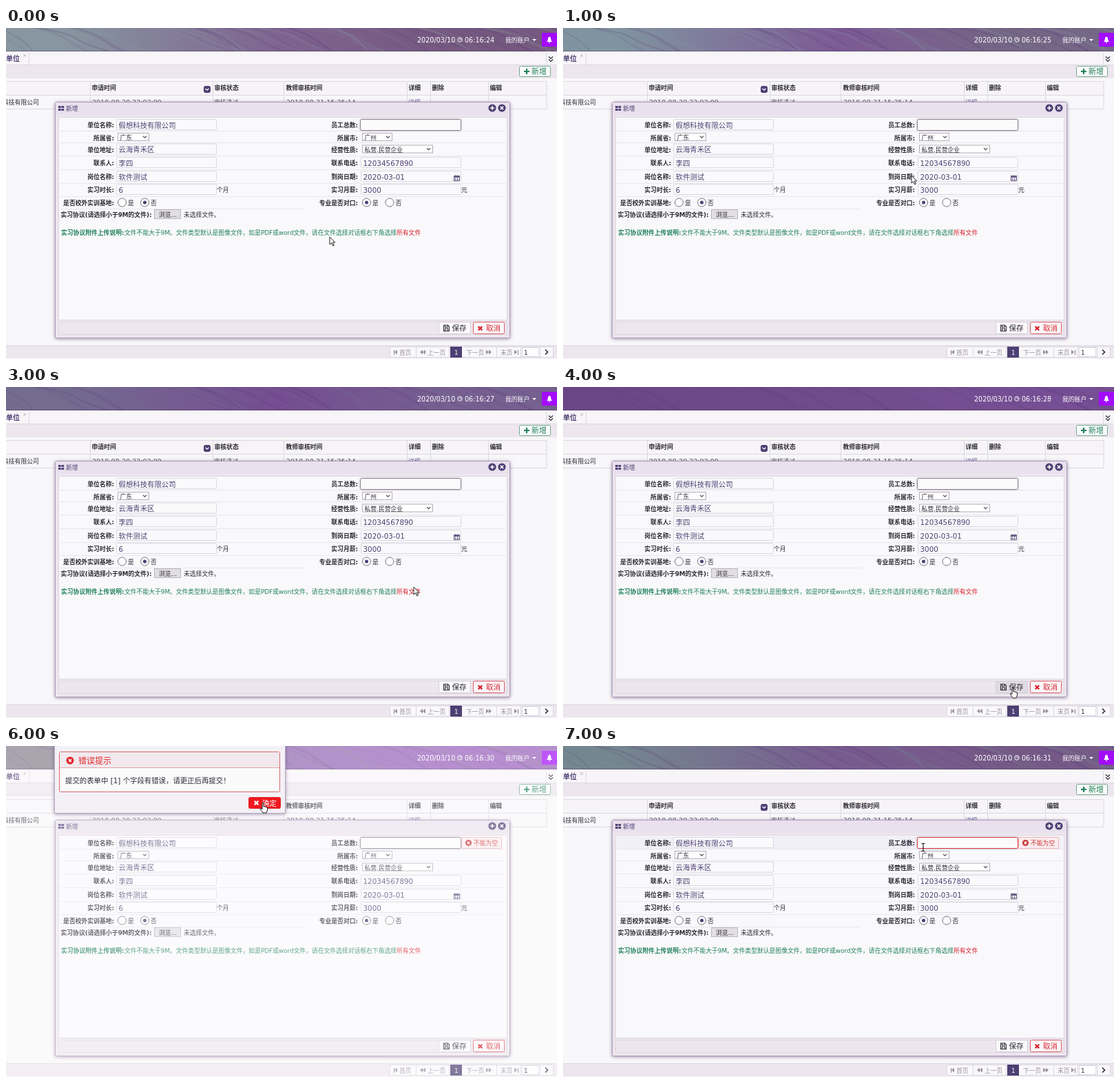
An HTML page that plays this animation: 800 by 480 pixels, repeating every 8 s.

```html
<!DOCTYPE html>
<html lang="zh-CN">
<head>
<meta charset="utf-8">
<title>新增</title>
<style>
html, body { margin: 0; width: 100%; height: 100%; overflow: hidden; background: #f8f7f9; }
svg { display: block; width: 800px; height: 480px; }
text { font-family: "DejaVu Sans", "Noto Sans CJK SC", "Noto Sans CJK", sans-serif; white-space: pre; }
.shadow { filter: drop-shadow(0 1px 2.5px #5e3f7290); }
.glow { filter: drop-shadow(0 0 1.5px #5e3f7260); }
</style>
</head>
<body>
<svg id="stage" viewBox="0 0 800 480"></svg>
<script>
const INK = '#2c2933', VIOLET = '#4c4073', GREEN = '#21825c', RED = '#d8202c', LINE = '#dcd8e2', BAR = '#ede6ee';
const SMALL = 8.8, MEDIUM = 10.4;

// One entry per second: header colours from left to right, pointer and its tip
const steps = [
  { sky: ['#8796a0', '#7f6390', '#75587f'], pointer: 'arrow', at: [470, 303] },
  { sky: ['#8094a0', '#7d5a95', '#756685'], pointer: 'arrow', at: [506, 214] },
  { sky: ['#7a9096', '#7a519a', '#74708b'], pointer: 'beam', at: [531, 142] },
  { sky: ['#736c8f', '#754c91', '#756090'], pointer: 'arrow', at: [592, 290] },
  { sky: ['#6c4788', '#704c8b', '#764f94'], pointer: 'hand', at: [653, 436], saveHover: true },
  { sky: ['#8f7a9c', '#a455ce', '#906fa0'], pointer: 'arrow', at: [514, 279], alert: true, error: true },
  { sky: ['#847d8b', '#8e64ae', '#985fbc'], pointer: 'hand', at: [373, 82], alert: true, error: true, okHover: true },
  { sky: ['#74868f', '#785a8f', '#755a87'], pointer: 'beam', at: [523, 147], error: true, invalid: true },
];

// Text is centred vertically on y
const text = (x, y, str, { size = SMALL, fill = INK, bold, end } = {}) =>
  `<text x="${x}" y="${y + size * .4}" font-size="${size}" fill="${fill}"` +
  `${bold ? ' font-weight="700"' : ''}${end ? ' text-anchor="end"' : ''}>${str}</text>`;
const box = (x, y, x2, y2, fill, stroke, r = 0, extra = '') => {
  const h = stroke ? .5 : 0;
  return `<rect x="${x + h}" y="${y + h}" width="${x2 - x - 2 * h}" height="${y2 - y - 2 * h}" rx="${r}" ` +
    `fill="${fill}" ${stroke ? `stroke="${stroke}"` : ''} ${extra}/>`;
};
const line = (d, stroke, width = 1) => `<path d="${d}" fill="none" stroke="${stroke}" stroke-width="${width}"/>`;
const shape = (d, fill) => `<path d="${d}" fill="${fill}"/>`;
const disc = (x, y, r, fill, stroke = 'none') => `<circle cx="${x}" cy="${y}" r="${r}" fill="${fill}" stroke="${stroke}"/>`;
const cross = (x, y, r, color, w) => line(`M${x - r} ${y - r}l${2 * r} ${2 * r}m0 ${-2 * r}l${-2 * r} ${2 * r}`, color, w);
const plus = (x, y, r, color, w) => line(`M${x - r} ${y}h${2 * r}M${x} ${y - r}v${2 * r}`, color, w);
const chevron = (x, y, r, color) => line(`M${x - r} ${y - r / 2}l${r} ${r}l${r} ${-r}`, color, 1.2);
const triangle = (x, y, dir, color) => shape(`M${x} ${y}l${-4 * dir} -3.5v7z`, color);

function header({ sky }, seconds) {
  let seed = 11, streaks = '';
  const random = () => (seed = seed * 16807 % 2147483647) / 2147483647;
  for (let i = 0; i < 50; i++) {
    const x = -60 + random() * 860, bend = 20 + random() * 50;
    streaks += `<g opacity="${.08 + random() * .2}">` +
      line(`M${x} -3q${bend} 8 ${bend + 15} 18t${bend} 22`, i % 2 ? sky[0] : '#5b3a78', 1 + random() * 3) + '</g>';
  }
  const stops = sky.map((color, i) => `<stop offset="${[.1, .5, .8][i]}" stop-color="${color}"/>`).join('');
  const white = { fill: '#fff', size: 9.6 };
  return `<linearGradient id="sky">${stops}</linearGradient>` + box(0, 0, 800, 34, 'url(#sky)') +
    `<svg width="800" height="34">${streaks}</svg>` + box(0, 33, 800, 34, '#4e3a62', '', 0, 'opacity=".5"') +
    text(597, 17, '2020/03/10', white) + disc(659, 17, 3.2, 'none', '#fff') + line('M659 15v2h2', '#fff', .8) +
    text(666, 17, '06:16:' + seconds, white) + text(725, 17, '我的账户', { fill: '#fff' }) +
    shape('M764 16h6l-3 3z', '#fff') + box(778, 7, 800, 27, '#a30cfb') +
    shape('M785 20q2-2 2-5q0-2 2-2.500q2 .5 2 2.500q0 3 2 5zM788 20.500h2v1.200h-2z', '#fff');
}

function table() {
  const columns = [[122, '申请时间'], [300, '审核状态'], [403, '教师审核时间'], [582, '详细'], [616, '删除'], [700, '编辑']];
  const gray = { fill: '#55505c' };
  return box(0, 34, 800, 53, '#f7f5f8') + text(0, 44, '单位', { size: 10, bold: true, fill: VIOLET }) +
    cross(27, 40, 1.8, '#aaa', .8) + line('M33.500 36v17M784.500 36v17M0 53.500h800', LINE) +
    chevron(791, 43, 3, INK) + chevron(791, 47, 3, INK) +
    box(0, 54, 800, 73, BAR) + box(745, 55, 791, 71, '#fbfafb', '#70a88e', 2) +
    plus(756, 63, 4, GREEN, 2.2) + text(763, 63, '新增', { size: 11, fill: GREEN }) +
    box(0, 77, 785, 97, '#f6f4f7') + line('M0 77.500h785v40H0M0 97.500h785', LINE) +
    columns.map(([x, name]) => line(`M${x + .5} 77v40`, LINE) +
      text(x + (x === 403 ? 3.5 : 2.500), 86.500, name, { bold: true })).join('') +
    box(287, 84, 297, 94, VIOLET, '', 3) + chevron(292, 89, 2.500, '#fff') +
    text(-5, 107, '科技有限公司') + text(125, 107, '2018-08-30 22:03:09', { ...gray, size: 9.5 }) +
    text(302, 107, '审核通过', gray) + text(407, 107, '2018-08-31 15:25:14', { ...gray, size: 9.5 }) +
    text(584, 107, '详细', { fill: '#6a5f9b' });
}

function pager() {
  const gray = '#99929e', label = { fill: gray };
  return box(0, 460, 800, 479, BAR) + line('M0 460.500h800', LINE) + box(557, 462, 795, 478, '#f9f8fa', LINE) +
    line('M595.500 462v16M643.500 462v16M712.500 462v16M747.500 462v16M775.500 462v16', LINE) +
    line('M563.500 467v7', gray, 1.2) + triangle(564, 470, -1, gray) + text(571, 470, '首页', label) +
    triangle(601, 470, -1, gray) + triangle(605, 470, -1, gray) + text(612, 470, '上一页', label) +
    box(645, 462, 662, 478, VIOLET) + text(651, 470, '1', { fill: '#fff' }) +
    text(668, 470, '下一页', label) + triangle(701, 470, 1, gray) + triangle(705, 470, 1, gray) +
    text(718, 470, '末页', label) + triangle(742, 470, 1, gray) + line('M743.500 467v7', gray, 1.2) +
    box(749, 463, 774, 477, '#fff', LINE) + text(752, 470, '1') + line('M783 466.500l3.500 3.500l-3.500 3.500', INK, 1.6);
}

const label = (x, y, str) => text(x, y, str + ':', { bold: true, end: true });
const input = (x, y, value) => box(x, y - 8, x + 146, y + 8, '#faf9fb', LINE, 1) +
  text(x + 3.500, y + .5, value, { size: MEDIUM, fill: VIOLET });
const select = (x, x2, y, value) => box(x, y - 6, x2, y + 6, '#fff', '#b3afb8') +
  text(x + 3.500, y + .5, value) + chevron(x2 - 6.500, y, 2.500, '#555');
const radio = (x, name, on) => disc(x, 253, 6, '#fff', '#77727f') + (on ? disc(x, 253, 2.500, VIOLET) : '') +
  text(x + 8.500, 253, name);

function form({ error, invalid, pointer }) {
  const hovered = pointer === 'beam';
  const labels = [
    [140, '单位名称', '员工总数'], [159, '所属省', '所属市'], [176, '单位地址', '经营性质'], [195, '联系人', '联系电话'],
    [215, '岗位名称', '到岗日期'], [234, '实习时长', '实习月薪'], [253, '是否校外实训基地', '专业是否对口'],
  ];
  const rules = [149, 166, 185, 205, 225, 244].map(y => `M78 ${y}.500h648`).join('') + 'M78 262.500h355';
  return (hovered ? box(78, 131, 726, 149, '#f1eff8') : '') + line(rules, '#eae7ee') +
    labels.map(([y, left, right]) => label(157, y, left) + label(511, y, right)).join('') +
    input(160, 140, '假想科技有限公司') + select(162, 208, 158, '广东') + input(160, 175.5, '云海青禾区') +
    input(160, 195, '李四') + input(160, 215, '软件测试') + input(160, 234, '6') + text(306, 234, '个月') +
    box(514, 132, 661, 149, '#fcfbfc', invalid ? '#d83a3e' : '#8d8190', 2, 'class="glow"') +
    select(517, 561, 158, '广州') + select(517, 620, 175.5, '私营.民营企业') + input(515, 195, '12034567890') +
    input(515, 215, '2020-03-01') + box(650, 214, 659, 222, '#fff', '#6a6088') + box(650, 214, 659, 217, '#6a6088') +
    line('M652.500 213v9M655.500 213v9M650 219.500h9', '#6a6088', .7) +
    input(515, 234, '3000') + text(661, 234, '元') +
    radio(168.5, '是') + radio(201.5, '否', true) + radio(523.5, '是', true) + radio(557, '否') +
    label(211.500, 270, '实习协议(请选择小于9M的文件)') + box(215, 263, 254, 277, '#e1dfe2', '#bbb7bf') +
    text(222, 270, '浏览...') + text(258, 270, '未选择文件。') +
    text(80, 296, '实习协议附件上传说明:', { bold: true, fill: GREEN }) +
    text(172, 296, '文件不能大于9M。文件类型默认是图像文件，如是PDF或word文件，请在文件选择对话框右下角选择', { fill: GREEN }) +
    text(567, 296, '所有文件', { fill: RED }) +
    (error ? box(661, 132, 720, 149, '#faecee', '#efb4b6', 1) + disc(671.500, 140.500, 4.6, '#c73b3e') +
      cross(671.500, 140.500, 1.7, '#fff', 1.3) + text(679, 140.500, '不能为空', { fill: '#cf3a3e' }) : '');
}

function dialog(step) {
  return box(71, 107, 732, 450, BAR, '#ab98b6', 2, 'class="shadow"') + box(72, 108, 731, 126, '#e9e1ed') +
    [76, 80.500].map(x => box(x, 113, x + 3.700, 116, VIOLET) + box(x, 117, x + 3.700, 120, VIOLET)).join('') +
    text(87, 116.5, '新增', { fill: VIOLET }) +
    disc(706, 116, 5.600, VIOLET) + plus(706, 116, 3, '#fff', 1.5) +
    disc(720, 116, 5.600, VIOLET) + cross(720, 116, 2.200, '#fff', 1.5) +
    box(76, 129, 728, 424, '#f9f8fa', LINE) + form(step) + box(76, 426, 728, 445, BAR, LINE) +
    box(628, 426, 675, 444, step.saveHover ? '#dfdae3' : '#f9f8fa', '#d3ced8', 2) +
    line('M635.500 431h6l2 2v6.500h-8zM637.500 431v3h3.500v-3M637.500 439v-3h4v3', INK, 1.1) +
    text(647.500, 435, '保存', { size: 10.600 }) +
    box(678, 426, 724, 444, '#fbf8fa', '#dc5a62', 2) + cross(688.500, 435.500, 2.800, RED, 2.300) +
    text(697, 435, '取消', { size: 10.600, fill: RED });
}

function alertBox({ okHover }) {
  const red = '#e0272b', ok = okHover ? '#fff' : red;
  return box(70, -4, 406, 98, '#f4f1f6', '#b5abc0', 2, 'class="shadow"') +
    box(77, 8, 398, 67, '#fbfafb', '#d9696b', 2) + box(78, 9, 397, 31, '#f1e9ee') + line('M78 31.500h319', '#e2a5a6') +
    disc(93, 21, 5.500, red) + cross(93, 21, 2, '#fff', 1.500) +
    text(105, 21, '错误提示', { size: 12, fill: red }) +
    text(86, 49.500, '提交的表单中 [1] 个字段有错误，请更正后再提交！', { size: MEDIUM }) +
    box(352, 74, 399, 91, okHover ? '#f01820' : '#fdfbfc', red, 2) + cross(363.500, 82.500, 2.800, ok, 2.300) +
    text(372, 82.500, '确定', { size: MEDIUM, fill: ok });
}

const pointers = {
  arrow: '<path d="M0 0v11l2.600-2.400l2 4.300l1.700-.8l-2-4.100h3.500z" fill="#fff" stroke="#111" stroke-width=".9"/>',
  beam: line('M-2.500 -5.500h2l.5.500l.5-.5h2M0 -5v10M-2.500 5.500h2l.5-.5l.5.500h2', '#111', 1.1),
  hand: '<path d="M-1 1q1-2 2 0v5l1-.5l1 .7l1-.3l1 .8l1.500.3v4q-.5 2-1.500 4h-5q-1-2-4-6q.5-1.500 3 .5z" ' +
    'fill="#fff" stroke="#111" stroke-width=".9"/>',
};

const scene = (step, index) => box(0, 0, 800, 480, '#f8f7f9') + header(step, 24 + index) + table() + pager() + dialog(step) +
  (step.alert ? box(0, 0, 800, 480, '#fff', '', 0, 'opacity=".3"') + alertBox(step) : '') +
  `<g transform="translate(${step.at})">${pointers[step.pointer]}</g>`;

const stage = document.getElementById('stage');
let shown = -1;
function render() {
  const index = Math.floor(performance.now() / 1000) % steps.length;
  if (index !== shown) stage.innerHTML = scene(steps[shown = index], index);
  requestAnimationFrame(render);
}
render();
</script>
</body>
</html>
```
